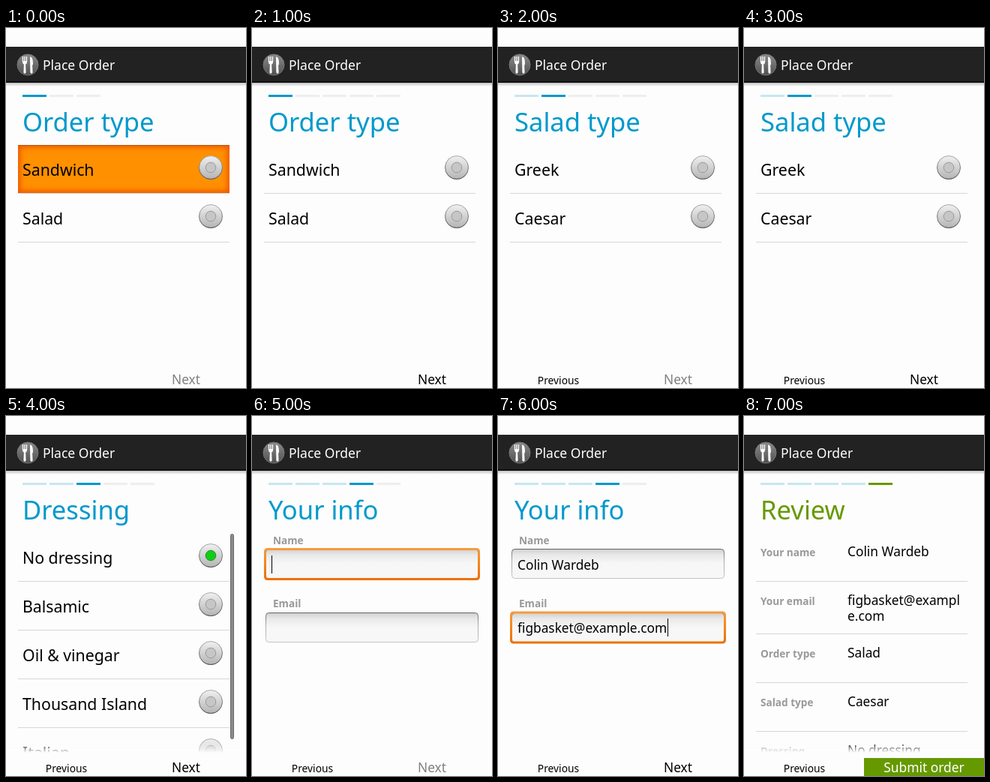
These frames come from a looping animation (320 by 480 pixels, 8 s). An HTML page:

```html
<!DOCTYPE html>
<html lang="en">
<head>
<meta charset="utf-8">
<title>Place Order</title>
<style>
  html, body { margin: 0; width: 100%; height: 100%; overflow: hidden; background: #fdfdfd; }
  svg { display: block; width: 320px; height: 480px; font-family: "Noto Sans", "Open Sans", sans-serif; }
  text { white-space: pre; }

  /* Each group is visible for --span seconds, starting at second --at. */
  .show { opacity: 0; animation: 8s step-end infinite; animation-delay: calc((var(--at) - 8) * 1s); }
  .for1 { animation-name: for1; }
  .for2 { animation-name: for2; }
  .for6 { animation-name: for6; }
  .for7 { animation-name: for7; }
  @keyframes for1 { 0% { opacity: 1 } 12.5% { opacity: 0 } }
  @keyframes for2 { 0% { opacity: 1 } 25% { opacity: 0 } }
  @keyframes for6 { 0% { opacity: 1 } 75% { opacity: 0 } }
  @keyframes for7 { 0% { opacity: 1 } 87.5% { opacity: 0 } }

  /* "Next" is grey until the page has been filled in. */
  .next { animation: next 8s step-end infinite; }
  @keyframes next {
    0%, 25%, 62.5% { fill: #808080 }
    12.5%, 37.5%, 75% { fill: #000 }
  }
</style>
</head>
<body>
<svg id="stage" viewBox="0 0 320 480">
  <defs>
    <linearGradient id="knob" x2="0" y2="1">
      <stop stop-color="#f0f0f0"/><stop offset="1" stop-color="#b4b4b4"/>
    </linearGradient>
    <linearGradient id="rim" x2="0" y2="1">
      <stop stop-color="#aaa"/><stop offset="1" stop-color="#555"/>
    </linearGradient>
    <linearGradient id="badge" x2="0" y2="1">
      <stop stop-color="#8a8a8a"/><stop offset="1" stop-color="#505050"/>
    </linearGradient>
    <linearGradient id="shadow" x2="0" y2="1">
      <stop stop-color="#c4c0c4"/><stop offset="1" stop-color="#fdfdfd"/>
    </linearGradient>
    <linearGradient id="box" x2="0" y2="1">
      <stop stop-color="#cfcfcf"/><stop offset=".2" stop-color="#e9e9e9"/>
      <stop offset=".5" stop-color="#f7f7f7"/><stop offset="1" stop-color="#f7f7f7"/>
    </linearGradient>
    <linearGradient id="boxEdge" x2="0" y2="1">
      <stop stop-color="#666"/><stop offset=".4" stop-color="#aaa"/><stop offset="1" stop-color="#c4c4c4"/>
    </linearGradient>
    <linearGradient id="focus" x2="0" y2="1">
      <stop stop-color="#f99a3c"/><stop offset="1" stop-color="#ee7000"/>
    </linearGradient>
    <linearGradient id="fade" x2="0" y2="1">
      <stop stop-color="#fdfdfd" stop-opacity="0"/><stop offset="1" stop-color="#fdfdfd"/>
    </linearGradient>
    <filter id="blur"><feGaussianBlur stdDeviation="3.5"/></filter>
    <clipPath id="rowClip"><rect x="16" y="156" width="282" height="64"/></clipPath>
    <clipPath id="listClip"><rect y="78" width="320" height="371"/></clipPath>
  </defs>
</svg>
<script>
  const BLUE = '#0099cc', GREEN = '#669900', DONE = '#c8e6f0', TODO = '#eeeeee';
  const NAME = 'Colin Wardeb', MAIL = 'figbasket@example.com';

  const rect = (x, y, w, h, fill, extra = '') =>
    `<rect x="${x}" y="${y}" width="${w}" height="${h}" fill="${fill}" ${extra}/>`;
  const text = (x, y, size, label, fill = '#000', extra = '') =>
    `<text x="${x}" y="${y}" font-size="${size}" fill="${fill}" ${extra}>${label}</text>`;
  const circle = (x, y, r, fill, stroke) =>
    `<circle cx="${x}" cy="${y}" r="${r}" fill="${fill}" stroke="${stroke}"/>`;
  const show = (at, span, content) =>
    `<g class="show for${span}" style="--at:${at}">${content}</g>`;

  const caption = (x, y, label) => text(x, y, 13.6, label, '#999', 'font-weight="700"');
  const button = (x, size, label, fill, extra = '') =>
    text(x, 475, size, label, fill, `text-anchor="middle" ${extra}`);
  const divider = y => rect(16, y, 282, 1, '#d6d6d6');

  function heading(title, step, color = BLUE) {
    const bars = [0, 1, 2, 3, 4].map(i =>
      rect(22 + 36 * i, 89, 32, 3, i < step ? DONE : i === step ? color : TODO));
    return bars.join('') + text(22, 138, 34.6, title, color);
  }

  function radio(y, on) {
    return circle(273, y + .7, 15.3, '#777', 'none') +
      circle(273, y, 15.5, 'url(#knob)', 'url(#rim)') +
      circle(273, y, 6.8, on ? '#0fce16' : '#c6c6c6', on ? '#2a8a2c' : '#999');
  }

  function choices(labels, picked = -1) {
    return labels.map((label, i) => {
      const y = 156 + 65 * i;
      return text(22, y + 41, 21.3, label) + radio(y + 30, i === picked) + divider(y + 64);
    }).join('');
  }

  const scrolled = content =>
    `<g clip-path="url(#listClip)">${content}${rect(0, 435, 320, 14, 'url(#fade)')}</g>`;

  function field(y) {
    return rect(18.5, y + .5, 283, 39, 'url(#box)', 'rx="4" stroke="url(#boxEdge)"');
  }
  const focusRing = y =>
    rect(17.5, y - .5, 285, 40, 'none', 'rx="3" stroke="url(#focus)" stroke-width="3"');
  const caret = (x, y) => rect(x, y, 1, 24, '#000');

  function reviewRow(y, label, lines, end) {
    return caption(22, y, label) +
      lines.map((line, i) => text(138, y + 21 * i, 17.3, line)).join('') + divider(end);
  }

  const actionBar =
    rect(0, 25, 320, 48, '#222') + rect(0, 71, 320, 2, '#111') +
    rect(0, 73, 320, 5, 'url(#shadow)') +
    circle(29, 49, 14, 'url(#badge)', '#777') +
    `<path d="M22.5 38v7M25 38v7M27.5 38v7" stroke="#fff" stroke-width="1.3"/>
     <path d="M21.9 44h6.2q0 4-2 4.5l.5 11q-1.6 2.5-3.2 0l.5-11q-2-.5-2-4.5z
              M32 38.5q4-1 4 10l-.9 1 .5 10q-1.6 2.5-3.2 0z" fill="#fff"/>` +
    text(49, 56, 17.5, 'Place Order', '#fff');

  const pressedRow = `<g clip-path="url(#rowClip)">
    ${rect(16, 156, 282, 64, '#ff9000')}
    ${rect(15, 155, 284, 66, 'none', 'stroke="#ee5200" stroke-width="8" filter="url(#blur)"')}
    ${rect(16, 156, 282, 1, '#b85208')}</g>`;

  const orderPage =
    heading('Order type', 0) + choices(['Sandwich', 'Salad']);
  const shortOrder = rect(128, 88, 72, 5, '#fdfdfd') + pressedRow +
    text(22, 197, 21.3, 'Sandwich') + radio(186);

  const saladPage = heading('Salad type', 1) + choices(['Greek', 'Caesar']);

  const dressingPage = heading('Dressing', 2) +
    scrolled(choices(['No dressing', 'Balsamic', 'Oil &amp; vinegar', 'Thousand Island', 'Italian'], 0)) +
    rect(299.5, 157.5, 4, 273, '#8c8c8c', 'rx="2" stroke="#666"');

  const infoPage = heading('Your info', 3) +
    caption(28, 171, 'Name') + field(177) + caption(28, 255, 'Email') + field(262);
  const nameEmpty = focusRing(178) + caret(26, 186);
  const infoFilled = text(26, 205, 17.3, NAME) + focusRing(262.5) +
    text(26, 289, 17.3, MAIL) + caret(226, 270);

  const reviewPage = heading('Review', 4, GREEN) + scrolled(
    reviewRow(187, 'Your name', [NAME], 220) +
    reviewRow(252, 'Your email', [MAIL.slice(0, 16), MAIL.slice(16)], 290) +
    reviewRow(322, 'Order type', ['Salad'], 355) +
    reviewRow(387, 'Salad type', ['Caesar'], 420) +
    reviewRow(452, 'Dressing', ['No dressing'], 485)) +
    rect(160, 456, 160, 24, GREEN) + button(240, 17.4, 'Submit order', '#fff');

  document.getElementById('stage').insertAdjacentHTML('beforeend',
    rect(0, 0, 320, 480, '#fdfdfd') + actionBar +
    show(0, 2, orderPage) + show(0, 1, shortOrder) +
    show(2, 2, saladPage) +
    show(4, 1, dressingPage) +
    show(5, 2, infoPage) + show(5, 1, nameEmpty) + show(6, 1, infoFilled) +
    show(7, 1, reviewPage) +
    show(2, 6, button(80.5, 13.8, 'Previous', '#000')) +
    show(0, 7, button(240, 17.3, 'Next', '#808080', 'class="next"')));
</script>
</body>
</html>
```
